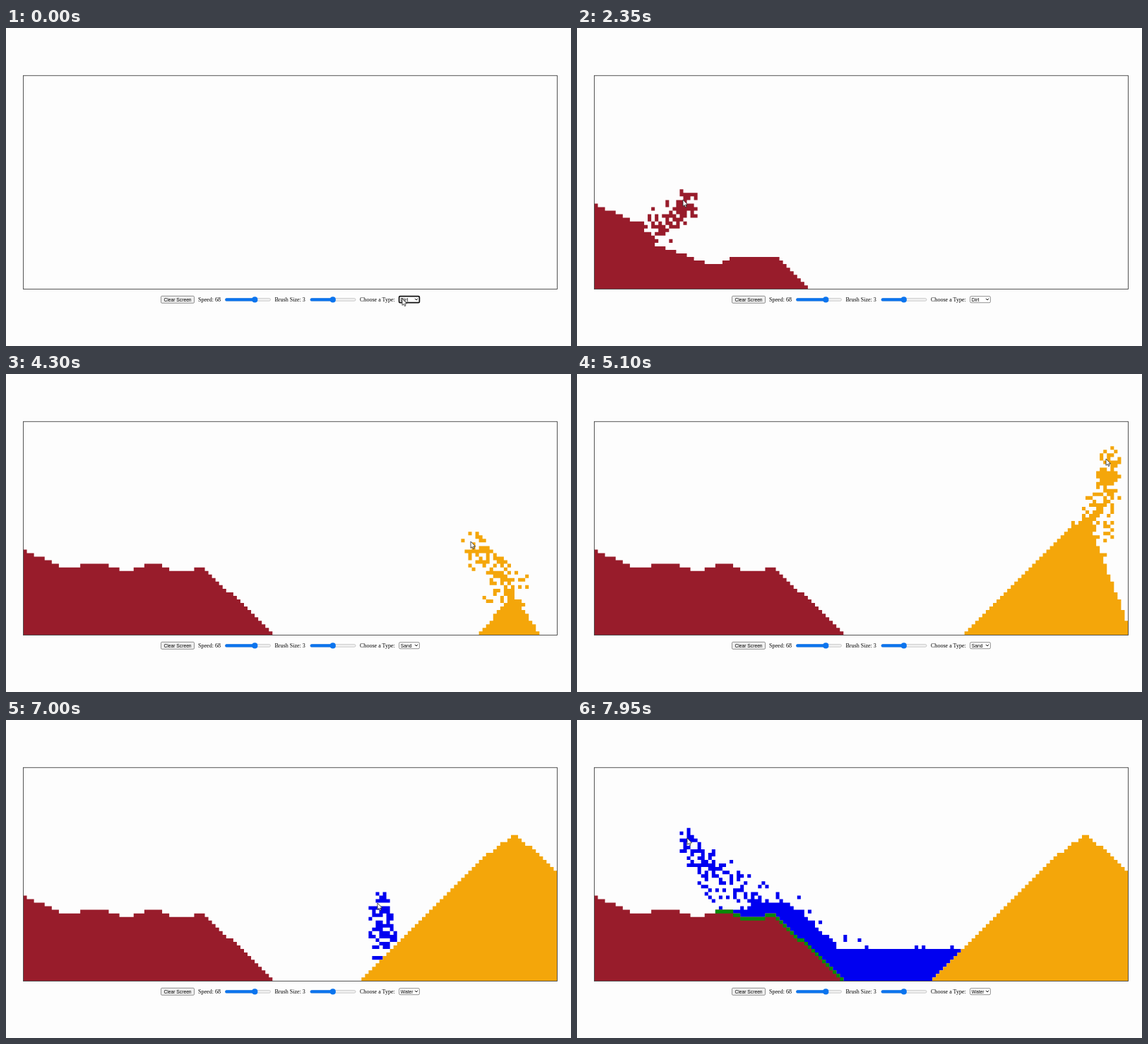
Write an HTML page that moves like this. It is 800x450 px and loops after 8 s.

```html
<!DOCTYPE html>
<html lang="en">
<head>
<meta charset="utf-8">
<title>Falling particles</title>
<style>
  html, body { margin: 0; width: 100%; height: 100%; overflow: hidden; background: #fdfdfd; }
  svg { display: block; width: 800px; height: 450px; }
  .label { font: 8.06px "Liberation Serif", serif; }
  .ui { font: 6.72px "Liberation Sans", sans-serif; }
</style>
</head>
<body>
<svg viewBox="0 0 800 450">
  <rect width="800" height="450" fill="#fdfdfd"/>
  <path id="water" fill="#0000f0"/>
  <path id="dirt" fill="#981c2b"/>
  <path id="sand" fill="#f4a60a"/>
  <path id="grass" fill="#088a08"/>
  <rect x="24.5" y="67.3" width="756" height="302.2" fill="none" stroke="#444" stroke-width=".9"/>

  <rect x="219.5" y="379.3" width="47" height="10" rx="1.4" fill="#efefef" stroke="#767676" stroke-width=".8"/>
  <text class="ui" x="243" y="386.8" text-anchor="middle">Clear Screen</text>
  <text class="label" x="272" y="387">Speed: 68</text>
  <text class="label" x="380.5" y="387">Brush Size: 3</text>
  <text class="label" x="501" y="387">Choose a Type:</text>
  <g id="sliders"></g>
  <rect id="select" x="556.6" y="379.7" width="28.8" height="9" rx="1.5" fill="#fff"/>
  <text class="ui" id="type" x="558.8" y="386.6"></text>
  <path d="M579 382.8l2 2.2l2-2.2" fill="none" stroke="#111"/>
  <path id="cursor" d="M0 0V9.4L2.1 7.5L3.5 10.6L5 10L3.7 7H6.6Z" fill="#fff" stroke="#222" stroke-width=".8"/>
</svg>
<script>
const $ = id => document.getElementById(id);
const { min, max, floor, round, sin, cos, exp, sqrt, PI } = Math;
const CELL = 5.04, COLS = 150, ROWS = 60, X0 = 24.5, Y0 = 67, LOOP = 8000;

$('sliders').innerHTML = [[310.5, 352.3], [431, 462.8]].map(([x, thumb]) =>
  `<rect x="${x}" y="382.5" width="64" height="3.8" rx="1.9" fill="#efefef" stroke="#b2b2b2" stroke-width=".6"/>
   <rect x="${x - .3}" y="382.2" width="${thumb - x}" height="4.4" rx="2.2" fill="#0b74ee"/>
   <circle cx="${thumb}" cy="384.4" r="4.1" fill="#0b74ee"/>`).join('');

const rnd = n => { const v = sin(n * 127.1 + 3.7) * 43758.5453; return v - floor(v); };
const linear = p => min(1, max(0, p));
const smooth = p => (p = linear(p), p * p * (3 - 2 * p));

// Values of [[time, ...values], ...] at time t
function tween(keys, t, ease) {
  const k = max(1, keys.findIndex(key => key[0] >= t));
  const a = keys[k - 1], b = t > keys.at(-1)[0] ? keys.at(-1) : keys[k];
  const p = a === b ? 1 : ease((t - a[0]) / (b[0] - a[0]));
  return a.slice(1).map((v, i) => v + (b[i + 1] - v) * p);
}

// Pointer tip: [time, x, y]
const POINTER = [
  [0, 561, 383], [250, 563, 431], [500, 258, 298], [860, 554, 378], [1200, 313, 287],
  [1400, 313, 287], [1950, 45, 226], [2350, 150, 243], [2750, 365, 252], [3050, 556, 377],
  [3500, 560, 403], [3900, 562, 397], [4050, 712, 250], [4300, 658, 237], [5100, 749, 120],
  [5200, 752, 116], [5450, 622, 142], [5680, 612, 146], [5800, 532, 291], [6200, 556, 377],
  [6600, 560, 404], [6820, 529, 264], [7000, 526, 259], [7950, 156, 167]
];
const pointer = t => tween(POINTER, t, smooth);

// Dirt: a low layer swept from right to left, then filled up from left to right
function dirtHeight(c, t) {
  const full = min(20 - .03 * c + cos((c - 20) * PI / 8) + 3.5 * exp(-c / 4), .96 * (70 - c));
  const layer = min(60 - c, max(18.5 - .36 * c, min(8.6, 7 + .4 * (c - 34))));
  const swept = smooth((t - 1500 - (57 - c) * 9) / 300);
  const front = 15.5 + (t - 2350) * .09;
  return max(0, round(min(full, layer * swept + max(0, front - c) * 2)));
}

// Sand: one growing heap, [time, left foot, left slope, peak, right slope]
const HEAP = [
  [4130, 130, 1, 0, 1], [4300, 127, 1.1, 10, 1.5], [5100, 103.5, 1, 33, 2.6],
  [5800, 101, 1.35, 41, .87], [6250, 94, 1, 41, .87]
];
function sandHeight(c, [foot, slope, peak, fall]) {
  const cap = c < 137 ? .78 * (137 - c) : fall * max(0, c - 138);
  return max(0, round(min((c - foot) * slope, peak - cap)));
}

// Water: a rising pool, and a stream that climbs the dirt with its front
const streamFront = t => 38 + (7950 - t) * .06;
function waterHeight(c, t, dirt) {
  const pool = 9 * linear((t - 7000) / 900);
  const stream = dirt ? min(22, 71.7 - .92 * c, dirt + (c - streamFront(t)) * .6) : 0;
  const level = round(max(pool, stream));
  return level > 1 && rnd(c) > .8 ? level + 1 : level;
}

const POURS = [['dirt', 1450, 2780], ['sand', 4040, 5680], ['water', 6820, LOOP]];
const FOCUS = [[0, 500], [850, 1450], [3080, 4040], [6350, 6820]];
const TICK = 25, PER_TICK = 11;

const cell = (c, r, n = 1) =>
  `M${(X0 + c * CELL).toFixed(2)} ${(Y0 + r * CELL).toFixed(2)}h${CELL}v${(n * CELL).toFixed(2)}h-${CELL}z`;

// Loose cells drop from the brush until they meet the surface
function pour(start, end, t, top) {
  const cells = new Set();
  const first = max(start, t - 1000);
  for (let born = first - first % TICK; born <= min(t, end); born += TICK) {
    const age = t - born;
    const [px, py] = pointer(born);
    for (let i = 0; i < PER_TICK; i++) {
      const seed = born * .37 + i * 11.3;
      const angle = rnd(seed) * PI * 2, radius = 3.3 * sqrt(rnd(seed + 1));
      const drift = (rnd(seed + 2) - .5) * age * .025;
      const fall = age * .06 * (.5 + .7 * rnd(seed + 3));
      const c = floor((px + 6 - X0) / CELL + radius * cos(angle) + drift);
      const r = floor((py + 2 - Y0) / CELL + radius * sin(angle) + fall);
      if (c >= 0 && c < COLS && r >= 0 && r < ROWS - top[c]) cells.add(cell(c, r));
    }
  }
  return [...cells].join('');
}

function draw(t) {
  const d = { dirt: '', sand: '', water: '', grass: '' };
  const top = [], heap = tween(HEAP, t, linear), front = streamFront(t);
  const fill = (name, c, from, to) => { if (to > from) d[name] += cell(c, ROWS - to, to - from); };

  for (let c = 0; c < COLS; c++) {
    const dirt = dirtHeight(c, t), sand = sandHeight(c, heap);
    const ground = max(dirt, sand), water = waterHeight(c, t, dirt);
    fill('dirt', c, 0, dirt);
    fill('sand', c, 0, sand);
    fill('water', c, ground, water);
    if (dirt && (water > dirt || c > front - 5)) fill('grass', c, dirt - 1, dirt);
    top.push(max(ground, water));
  }
  for (const [name, start, end] of POURS) d[name] += pour(start, end, t, top);
  for (const name in d) $(name).setAttribute('d', d[name]);

  const focused = FOCUS.some(([a, b]) => t >= a && t < b);
  $('select').setAttribute('stroke', focused ? '#101010' : '#767676');
  $('select').setAttribute('stroke-width', focused ? 1.7 : .8);
  $('type').textContent = t < 3550 ? 'Dirt' : t < 6650 ? 'Sand' : 'Water';
  $('cursor').setAttribute('transform', `translate(${pointer(t)})`);
}

const began = performance.now();
let shown = -1;
function tick() {
  const t = floor((performance.now() - began) % LOOP / 50) * 50;
  if (t !== shown) draw(shown = t);
  requestAnimationFrame(tick);
}
tick();
</script>
</body>
</html>
```
